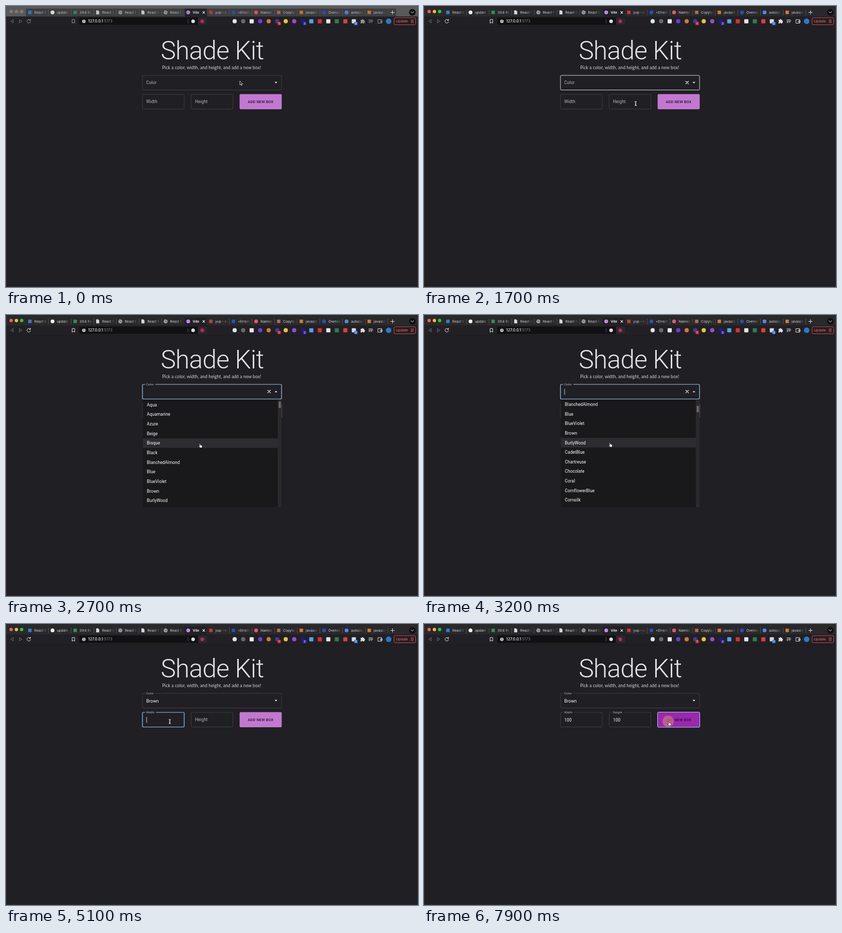
Write an HTML page that moves like this. It is 800 px wide and 547 px high and loops after 8 s.

```html
<!DOCTYPE html>
<html lang="en">
<head>
<meta charset="utf-8">
<title>Shade Kit</title>
<style>
html, body { margin: 0; width: 100%; height: 100%; overflow: hidden; background: #201f23; }
svg { display: block; font-family: Roboto, sans-serif; }
.ui { font-family: Inter, sans-serif; }
</style>
</head>
<body>
<svg id="stage" width="800" height="547" viewBox="0 0 800 547">
  <defs>
    <linearGradient id="fade" gradientUnits="userSpaceOnUse" x1="15" x2="40" y1="0" y2="0">
      <stop offset=".62" stop-color="#d2d2d4"/>
      <stop offset="1" stop-color="#d2d2d4" stop-opacity="0"/>
    </linearGradient>
    <clipPath id="list"><rect x="265.4" y="165" width="269.6" height="209"/></clipPath>
    <clipPath id="btnClip"><rect x="453.6" y="171.6" width="81.8" height="29.3" rx="2"/></clipPath>
  </defs>
</svg>
<script>
const LOOP = 8000, BG = '#201f23', ROW = 18.65, TOP = 167.7, EM = 8.27;
const NS = 'http://www.w3.org/2000/svg';
const stage = document.getElementById('stage');

function set(node, attrs) {
  for (const k in attrs) node.setAttribute(k, attrs[k]);
  return node;
}
function add(parent, tag, attrs, text) {
  const node = set(document.createElementNS(NS, tag), attrs || {});
  if (text !== undefined) node.textContent = text;
  parent.appendChild(node);
  return node;
}
const show = (node, on) => node.setAttribute('visibility', on ? 'visible' : 'hidden');
const clamp = v => Math.max(0, Math.min(1, v));
const ease = v => { v = clamp(v); return v * v * (3 - 2 * v); };
const line = (p, d, color, w = 1) =>
  add(p, 'path', { d, fill: 'none', stroke: color, 'stroke-width': w, 'stroke-linecap': 'round', 'stroke-linejoin': 'round' });
const dot = (p, cx, cy, r, fill) => add(p, 'circle', { cx, cy, r, fill });
const box = (p, x, y, width, height, fill, rx = 0) => add(p, 'rect', { x, y, width, height, fill, rx });

// Window and tab strip
box(stage, 0, 0, 800, 547, BG);
const strip = box(stage, 0, 0, 800, 20.5, '#5a5a5b');
const tabBack = box(stage, 38.5, 5, 719, 15.5, '#3e3e40');
const chrome = add(stage, 'g', { class: 'ui' });
const lights = ['#ff5f57', '#febc2e', '#28c840'].map((c, i) => [dot(chrome, 10 + i * 10.2, 10.7, 3.2, c), c]);
const tabRow = add(chrome, 'g', { 'font-size': 6.6 });
box(tabRow, 347, 5, 43, 16, '#212024');
[['React B', 's#2d7fd0'], ['update', 'c#f2f2f2'], ['39.6 Re', 's#2f8f5b'], ['React S', 'doc'], ['React Fo', 'web'],
 ['React Fi', 'doc'], ['React fo', 'web'], ['Vite', 'c#b58cf0'], ['yup - np', 's#cb3837'], ['<ErrorM', 'c#2351b8'],
 ['Named', 'c#f0526a'], ['Copytab', 's#b06a56'], ['javascri', 's#d97a2b'], ['Overview', 'c#2351b8'],
 ['autocom', 'c#4a8af4'], ['javascri', 's#d97a2b']].forEach(([name, icon], i) => {
  const g = add(tabRow, 'g', { transform: `translate(${39 + i * 43.92} 0)` });
  if (icon === 'doc') {
    add(g, 'path', { d: 'M4.3 8.5h3.8l2.2 2.2v5.5h-6z', fill: '#d6d6d6' });
  } else if (icon === 'web') {
    dot(g, 7.4, 12.4, 3.8, '#a8a8aa');
    line(g, 'M4 11h3l1 2-2 2M8 9l2 1M9 13l1.5.5', '#454547', .8);
  } else if (icon[0] === 'c') {
    dot(g, 7.4, 12.4, 3.7, icon.slice(1));
  } else {
    box(g, 4.1, 9.1, 6.6, 6.6, icon.slice(1));
  }
  const on = i === 7;
  add(g, 'text', { x: 16, y: 14.8, fill: on ? '#fff' : 'url(#fade)', 'font-weight': on ? 600 : 400 }, name);
  if (on) line(g, 'M35.6 10.6l3.8 3.8m0-3.8l-3.8 3.8', '#fff', 1.1);
  else if (i !== 6) line(g, 'M43.5 7.5v10', '#626264', .7);
});
line(chrome, 'M750.5 9v7M747 12.5h7', '#dcdcdc', 1);
dot(chrome, 789, 12.3, 6.5, '#111113');
line(chrome, 'M786.3 11.2l2.7 2.6 2.7-2.6', '#dcdcdc', 1);

// Toolbar
const bar = add(chrome, 'g');
box(bar, 0, 20.5, 800, 19.5, '#212024');
line(bar, 'M0 40.2h800', '#19181b', .7);
line(bar, 'M14 26.8v6l-4.6-3zM26 26.8v6l4.6-3z', '#77777a', .9);
const nav = add(bar, 'g');
line(nav, 'M47 27.5a3.5 3.5 0 1 0 .7 3M47.5 25.8v2.3h-2.3', '#e4e4e4', 1);
line(nav, 'M128.7 26.3h4.6v7l-2.3-1.8-2.3 1.8z', '#e4e4e4', 1);
box(bar, 142, 22.5, 248.5, 14.2, '#111113', 2.5);
dot(bar, 151.2, 29.8, 3.4, '#c8c8ca');
line(bar, 'M151.2 27.8v2.2M151.2 31.7v.1', '#111113', .9);
const url = add(bar, 'text', { x: 159.6, y: 32.4, 'font-size': 7.4 });
add(url, 'tspan', { fill: '#f6f6f6', 'font-weight': 500 }, '127.0.0.1');
add(url, 'tspan', { fill: '#8b8b8f' }, ':5173');
line(bar, 'M353.5 26v7.5', '#6a6a6c', .7);
box(bar, 372.5, 22.5, 18, 14.2, '#2a292d', 2.5);
dot(bar, 363.3, 29.8, 3.5, '#dddde2');
dot(bar, 381, 29.8, 3.5, '#c2265c');

[['c', '#dce6f2'], ['c', '#69696c'], ['s', '#ececec'], ['c', '#6e3be0'], ['c', '#d9772f'], ['c', '#3b3aa8', '#e02828', '1'],
 ['c', '#e3c53a'], ['c', '#9a49d6'], ['c', '#211a80', '#3d2fc0', '2'], ['s', '#58a0ee'], ['s', '#d92f33'], ['s', '#e6e6e4'],
 ['s', '#2f7d4c'], ['s', '#d8403a'], ['s', '#d5dbe4', '#2f73dc', '12']].forEach(([kind, color, badge, n], i) => {
  const x = 444 + i * 16.53;
  if (kind === 'c') dot(bar, x, 29.7, 4.1, color);
  else box(bar, x - 4, 25.7, 8, 8, color, 1);
  if (badge) {
    box(bar, x + .5, 31, 6.6, 6.2, badge, 1.2);
    add(bar, 'text', { x: x + 3.8, y: 36, 'font-size': 4.8, fill: '#fff', 'text-anchor': 'middle' }, n);
  }
});
add(nav, 'path', { d: 'M688.5 27h2.2a1.5 1.5 0 0 1 3 0h2v2.3a1.4 1.4 0 0 1 0 2.8v2h-2.4a1.3 1.3 0 0 0-2.6 0h-2.2v-2.3a1.4 1.4 0 0 0 0-2.5z', fill: '#dededf' });
line(nav, 'M704.5 27h7M704.5 29.5h5M704.5 32h3M710 32.5v-3l2.5-.5', '#dededf', 1);
line(nav, 'M722.5 26.5h7v7h-7zM730 29h-3v2.5h3z', '#dededf', 1);
dot(bar, 743, 29.7, 5.4, '#2d78c8');
add(bar, 'rect', { x: 753.5, y: 22.8, width: 42, height: 13.6, rx: 2.5, fill: '#241d21', stroke: '#e2504f', 'stroke-width': .9 });
add(bar, 'text', { x: 757, y: 32.1, 'font-size': 6.8, fill: '#ee7170' }, 'Update');
line(bar, 'M786.5 27.2h4.6M786.5 29.7h4.6M786.5 32.2h4.6', '#ee7170', .9);

// Page
add(stage, 'text', { x: 400.5, y: 104, 'font-size': 49.6, 'font-weight': 300, 'letter-spacing': -.77, 'text-anchor': 'middle', fill: '#e4e3e5' }, 'Shade Kit');
add(stage, 'text', { x: 399.3, y: 122.6, 'font-size': 8.5, 'letter-spacing': .1, 'text-anchor': 'middle', fill: '#d6d5d8', 'font-family': 'Lato, sans-serif' },
  'Pick a color, width, and height, and add a new box!');

function makeField(x, y, w, name) {
  const h = 28.5, g = add(stage, 'g');
  const frame = add(g, 'rect', { x, y, width: w, height: h, rx: 2, fill: 'none' });
  const notch = box(g, x + 5, y - 1, 0, 2.2, BG);
  const label = add(g, 'text', { 'font-size': EM, 'letter-spacing': .078 }, name);
  const value = add(g, 'text', { x: x + 7.6, y: y + 17.5, 'font-size': EM, 'letter-spacing': .078, fill: '#fff' });
  const caret = box(g, 0, y + 9, .8, 11.2, '#fff');
  const hit = (px, py) => px > x && px < x + w && py > y && py < y + h;
  function draw({ text, up, focus, hover, caretOn }) {
    set(frame, { stroke: focus ? '#90caf9' : hover ? '#fff' : '#4d4c50', 'stroke-width': focus ? 1.2 : hover ? .8 : .7 });
    notch.setAttribute('width', up * (label.getComputedTextLength() * .75 + 5));
    set(label, {
      transform: `translate(${x + 7.3 - up * .4} ${y + 17.2 - up * 15}) scale(${1 - up * .25})`,
      fill: focus ? '#90caf9' : '#b5b4b7'
    });
    value.textContent = text;
    caret.setAttribute('x', x + 7.6 + (text ? value.getComputedTextLength() : 0));
    show(caret, focus && caretOn);
  }
  return { draw, hit };
}
const color = makeField(265, 135, 270, 'Color');
const width = makeField(265, 172, 81, 'Width');
const height = makeField(359.6, 172, 81, 'Height');
const clear = line(stage, 'M508.3 146.5l5.2 5.2m0-5.2l-5.2 5.2', '#fff', 1.1);
const arrow = add(stage, 'path', { fill: '#fff' });

const button = box(stage, 453.6, 171.6, 81.8, 29.3, '#c278d0', 2);
add(stage, 'text', { x: 494.5, y: 189, 'font-size': 7.24, 'font-weight': 500, 'letter-spacing': .207, 'text-anchor': 'middle', fill: '#231526' }, 'ADD NEW BOX');
const ripple = add(stage, 'circle', { cx: 474, cy: 189.5, fill: '#d87a80', opacity: .65, 'clip-path': 'url(#btnClip)' });
const ring = add(stage, 'rect', { x: 453.5, y: 171.5, width: 82, height: 29.5, rx: 2, fill: 'none', stroke: '#a5d3f5', 'stroke-width': 1 });

// Dropdown
const menu = add(stage, 'g', { 'clip-path': 'url(#list)' });
box(menu, 265.4, 165, 270, 210, '#19181b');
const mark = box(menu, 265.4, 0, 263, ROW, '#2d2c30');
const rows = add(menu, 'g', { 'font-size': EM, 'letter-spacing': .078, fill: '#fff' });
('AliceBlue AntiqueWhite Aqua Aquamarine Azure Beige Bisque Black BlanchedAlmond Blue BlueViolet Brown BurlyWood ' +
 'CadetBlue Chartreuse Chocolate Coral CornflowerBlue Cornsilk Crimson').split(' ')
  .forEach((name, i) => add(rows, 'text', { x: 273.6, y: TOP + (i + .5) * ROW + 3 }, name));
box(menu, 527.8, 165, 8, 210, '#2a292d');
const thumb = box(menu, 529.4, 165, 4.4, 13, '#69686c', 2);

// Pointer
const pointer = add(stage, 'g');
const shape = (d, fill, stroke) => add(pointer, 'path', { d, fill, stroke, 'stroke-width': .8, 'stroke-linejoin': 'round' });
const shapes = {
  arrow: shape('M0 0v7.4l1.8-1.6 1.3 3 1.3-.6-1.3-2.8h2.4z', '#111', '#eee'),
  beam: shape('M-2-4q2 0 2 1.2 0-1.2 2-1.2M0-3v6M-2 4q2 0 2-1.2 0 1.2 2 1.2M-1 1h2', 'none', '#fff'),
  hand: shape('M.2.8q.8-1 1.5 0l.8 2.4q3.6-.2 3.5 1.6L5.5 8.5H2L-.8 5.4q-.2-1 1-.6l.8.6z', '#fff', '#222')
};
shapes.beam.setAttribute('stroke-width', 1.1);

const path = [[0, 454, 146], [100, 454, 146], [500, 440, 178], [900, 432, 184], [1200, 440, 165], [1400, 437, 152],
  [1600, 425, 158], [1700, 411, 190], [2000, 390, 235], [2300, 382.5, 246], [2700, 375, 250], [3200, 359.5, 248.5],
  [3600, 350, 235], [3800, 347, 231], [4000, 345, 229], [4300, 319.5, 205.5], [4700, 319, 195], [4800, 318, 190],
  [6900, 318, 190], [7400, 468, 188], [7600, 473.8, 189.5], [LOOP, 473.8, 189.5]];
function at(t) {
  t = Math.max(0, t);
  const i = Math.max(1, path.findIndex(p => p[0] >= t));
  const a = path[i - 1], b = path[i], k = (t - a[0]) / (b[0] - a[0]);
  return [a[1] + (b[1] - a[1]) * k, a[2] + (b[2] - a[2]) * k];
}

line(stage, 'M.3 0v547M799.7 0v547M0 546.7h800', '#434246', .6);

const typed = (t, text, times) => text.slice(0, times.filter(k => t >= k).length);
const blink = (t, resets) => {
  const last = resets.filter(r => t >= r).pop();
  return last !== undefined && (t - last) % 1000 < 500;
};

function render(t) {
  const active = t >= 400, open = t >= 1800 && t < 4000;
  strip.setAttribute('fill', active ? '#29292b' : '#5a5a5b');
  show(tabBack, !active);
  lights.forEach(([node, c]) => node.setAttribute('fill', active ? c : '#7b7b7c'));
  tabRow.setAttribute('opacity', active ? 1 : .87);
  nav.setAttribute('opacity', active ? 1 : .6);

  const [x, y] = at(t), [hx, hy] = at(t - 100);
  const hover = f => active && !open && f.hit(hx, hy);
  const focusColor = t >= 1800 && t < 4800;
  const focusWidth = t >= 4800 && t < 5900;
  const focusHeight = t >= 5900 && t < 7800;
  const caretOn = blink(t, [1750, 4000, 4800, 5200, 5400, 5600, 5900, 6200, 6400, 6600]);
  const overColor = hover(color);

  color.draw({ text: t >= 4000 ? 'Brown' : '', up: ease((t - 1700) / 200), focus: focusColor, hover: overColor, caretOn });
  width.draw({ text: typed(t, '100', [5200, 5400, 5600]), up: ease((t - 4700) / 200), focus: focusWidth, hover: hover(width), caretOn });
  height.draw({ text: typed(t, '100', [6200, 6400, 6600]), up: ease((t - 5800) / 200), focus: focusHeight, hover: hover(height), caretOn });
  show(clear, focusColor || overColor);
  arrow.setAttribute('d', open ? 'M521.6 150.3h5.2l-2.6-2.6z' : 'M521.6 147.8h5.2l-2.6 2.6z');

  const k = ease((t - 7300) / 250);
  const mix = (a, b) => Math.round(a + (b - a) * k);
  button.setAttribute('fill', `rgb(${mix(194, 156)},${mix(120, 39)},${mix(208, 176)})`);
  show(ring, t >= 7800);
  show(ripple, t >= 7800);
  ripple.setAttribute('r', 5 + 6 * clamp((t - 7800) / 100));

  show(menu, open);
  const scroll = 152.3 * ease((t - 2500) / 600);
  const pick = t < 2400 ? 1 : Math.floor((y - TOP + scroll) / ROW);
  mark.setAttribute('y', TOP + pick * ROW - scroll);
  show(mark, open && t >= 2000);
  rows.setAttribute('transform', `translate(0 ${-scroll})`);
  thumb.setAttribute('y', 165.3 + scroll * .0735);

  const inField = [color, width, height].some(f => f.hit(x, y));
  const onButton = x > 454 && x < 535 && y > 172 && y < 200.5;
  const kind = !active ? 'arrow' : (open && y > 165) || onButton ? 'hand' : inField ? 'beam' : 'arrow';
  const seen = t < 5200 || t >= 6900;
  for (const s in shapes) show(shapes[s], seen && s === kind);
  pointer.setAttribute('transform', `translate(${x} ${y})`);
}

const start = performance.now();
function tick() {
  const t = (performance.now() - start) % LOOP;
  render(Math.floor(t / 100) * 100);
  requestAnimationFrame(tick);
}
tick();
</script>
</body>
</html>
```
